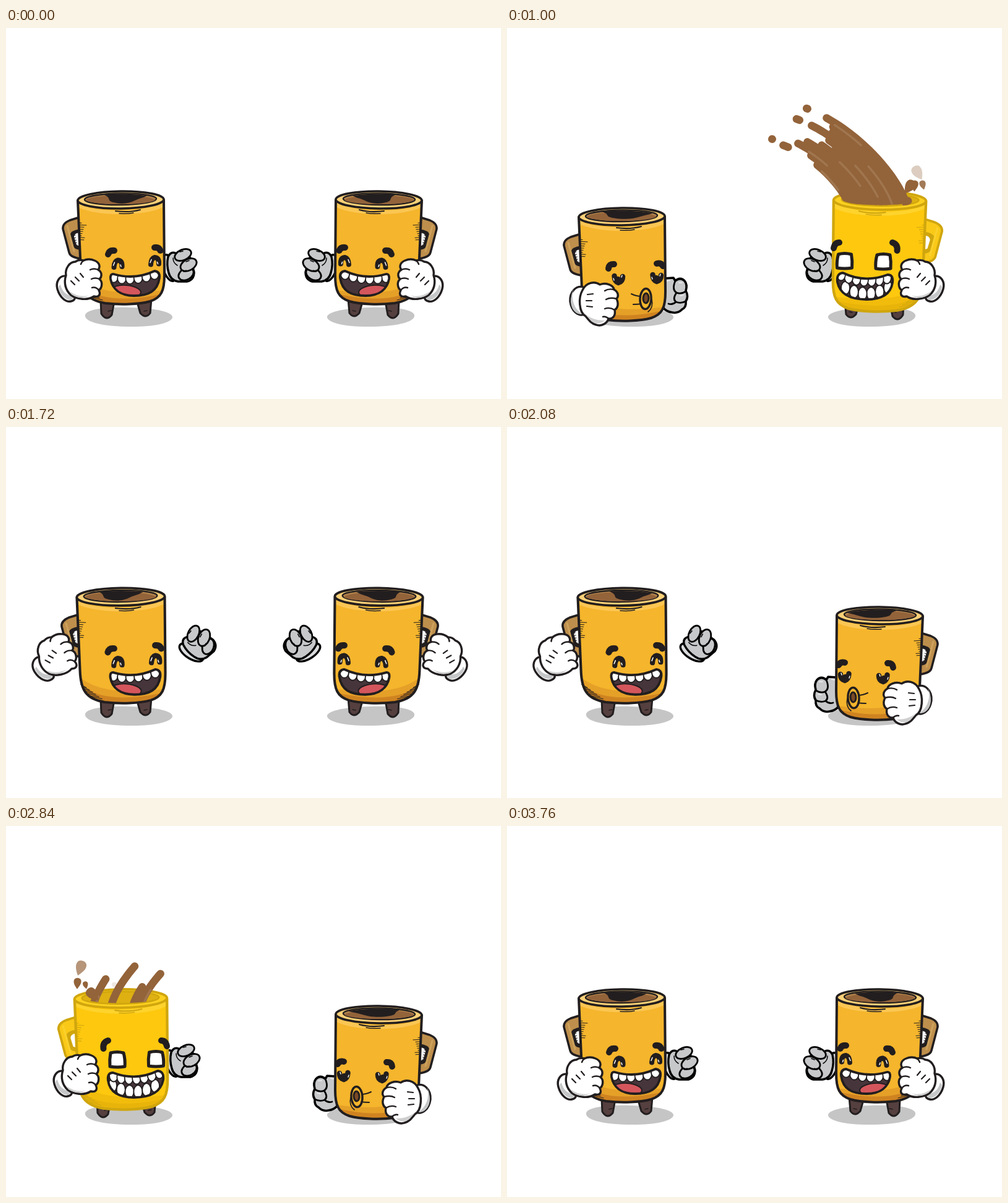
Write an HTML page with a canvas that moves like this. It is 800 by 600 pixels and loops after 3.8 s.

```html
<!DOCTYPE html>
<html lang="en">
<head>
<meta charset="utf-8">
<title>Coffee mugs</title>
<style>
html, body { margin: 0; width: 100%; height: 100%; overflow: hidden; background: #fff; }
canvas { display: block; width: 800px; height: 600px; }
</style>
</head>
<body>
<canvas id="stage" width="800" height="600"></canvas>
<script>
const ctx = document.getElementById('stage').getContext('2d');
const LOOP = 3800, SWAP = 1680, MIRROR = 788;
const INK = '#221e1f', BROWN = '#93633a', TAU = Math.PI * 2;
const clamp = (v, a, b) => Math.max(a, Math.min(b, v));
const mix = (a, b, k) => a + (b - a) * k;
const tint = (a, b, k) => `rgb(${a.map((v, i) => Math.round(mix(v, b[i], k)))})`;

// Keys are time, value pairs; smooth eases each span.
function track(t, keys, smooth = true) {
  if (t <= keys[0]) return keys[1];
  for (let i = 2; i < keys.length; i += 2) {
    if (t > keys[i]) continue;
    const k = (t - keys[i - 2]) / (keys[i] - keys[i - 2]);
    return mix(keys[i - 1], keys[i + 1], smooth ? k * k * (3 - 2 * k) : k);
  }
  return keys[keys.length - 1];
}

const cache = {};
const path = d => cache[d] || (cache[d] = new Path2D(d));
function shape(d, fill, stroke, width = 3.5) {
  const p = typeof d === 'string' ? path(d) : d;
  if (fill) { ctx.fillStyle = fill; ctx.fill(p); }
  if (stroke) { ctx.strokeStyle = stroke; ctx.lineWidth = width; ctx.stroke(p); }
}
function oval(x, y, rx, ry, fill, stroke, width, turn = 0) {
  const p = new Path2D();
  p.ellipse(x, y, rx, ry, turn, 0, TAU);
  shape(p, fill, stroke, width);
}
function group(draw) { ctx.save(); draw(); ctx.restore(); }
function about(x, y, sx, sy, turn = 0) {
  ctx.translate(x, y);
  ctx.rotate(turn * Math.PI / 180);
  ctx.scale(sx, sy);
  ctx.translate(-x, -y);
}

const SHADOW = 'M128 464C131 455 160 451 200 452C245 453 270 460 269 468C267 478 235 484 195 483C150 482 126 474 128 464Z';
const BODY = 'M116 279L121 395C122 425 130 440 160 445C185 448 215 447 233 442C251 436 256 425 256 400L255 278Z';
const SHADE = 'M119 404C145 426 185 433 257 424L257 450L119 450Z';
const DARK = 'M124 419C150 440 195 442 248 431L240 450L124 450Z';
const GLOW = 'M116 281C130 300 230 300 256 280L255 289C230 304 150 306 117 290Z';
const HANDLE = 'M119 306L103 311Q91 316 92 325L102 363Q104 371 121 373L121 357Q111 357 109 350L105 335Q106 329 119 327Z';
const HOLE = 'M119 327Q106 329 105 335L109 350Q111 357 121 357Z';

function handle(s) {
  shape(HOLE, s.ink);
  shape('M119 331L114 332Q110 334 110 338L114 351L120 353Z', '#fff');
  shape(HANDLE, s.handle, s.ink);
  shape('M99 320L110 361', null, s.handleShade, 3);
  if (s.hit < .5) {
    for (let i = 0; i < 5; i++) shape(`M${107 + i * .8} ${336 + i * 4}l5 -1`, null, s.ink, 1);
  }
}

function legs(h) {
  group(() => {
    ctx.translate(-6 * h, 2 * h);
    shape('M153 442L154 462Q162 475 171 464L175 442Z', '#55403f', INK, 3);
    shape('M165 458l5 -1', null, INK, 1.5);
  });
  group(() => {
    ctx.translate(7 * h, 2 * h);
    shape('M211 440L217 461Q226 471 233 461L235 438Z', '#55403f', INK, 3);
    shape('M223 458l5 -1', null, INK, 1.5);
  });
}

function body(s, t) {
  shape(BODY, s.fill);
  group(() => {
    ctx.clip(path(BODY));
    shape(SHADE, s.shade);
    shape(DARK, s.dark);
    shape(GLOW, s.glow);
  });
  shape(BODY, null, s.ink, 4);
  for (let i = 0; i < 9; i++) {
    shape(`M118 ${315 + i * 3.4}l${i === 1 ? 12 : 4 + (i * 5) % 6} .5`, null, s.ink, 1);
    if (i < 6) shape(`M${122 + i * 3} ${417 + i * 3.6}l${9 + i * 2} 5`, null, s.ink, 1);
  }
  shape('M177 296Q199 299 217 294', null, s.ink, 2);
  shape('M183 300Q197 301 206 299', null, s.ink, 1.5);
  oval(185.5, 278, 69.5, 14, s.rim, s.ink, 3.6, -.012);
  oval(185, 276.8, 58, 9.3, s.inside, s.ink, 2.4, -.012);
  if (s.hit < .5) group(() => {
    const p = new Path2D();
    p.ellipse(185, 276.8, 57, 8.3, 0, 0, TAU);
    ctx.clip(p);
    oval(185, 280, 57, 9.5, BROWN);
    ctx.translate(9 * Math.sin(t / LOOP * TAU * 4), 0);
    about(190, 270, 1 + .3 * s.crouch, 1 - .15 * s.crouch);
    shape('M153 268C174 274 160 279 174 282C188 286 200 283 208 279C216 275 224 275 232 268Z', INK);
  });
}

function eyes(s) {
  for (let i = 0; i < 2; i++) group(() => {
    if (s.eyes === 'shock') {
      ctx.translate(i ? 239 + 3.5 * s.hit : 183 - 3 * s.hit, 378 - i);
      shape('M-11 -11Q0 -14 10 -11Q13 0 12 11Q0 13 -12 11Q-13 0 -11 -11Z', '#fff', INK, 5);
    } else if (s.eyes === 'heart') {
      ctx.translate(i * 62, -i * 2);
      shape('M173.5 374Q174 383 180 385Q187 383 187 375M180 383L179 379', null, INK, 8.5);
      shape('M185 376l1 -3M172 378l1 3', null, '#fff', 1.4);
    } else {
      ctx.translate(i * 59.5, -i * 4.5);
      shape('M174.5 387Q175 377 181 375.5Q188 376 187.5 386', null, INK, 8);
      shape('M173.5 384l2 -5M185 383l1 3', null, '#fff', 1.5);
    }
  });
  const brows = s.eyes === 'shock'
    ? ['M157.5 360Q156 350 165 347', 'M251 347Q258 347 260 356']
    : s.eyes === 'heart'
      ? ['M164 362Q165 354 173 355', 'M242 354Q249 352 252 358']
      : ['M165 366Q167 359 175 360', 'M240 355Q247 354 249.5 360'];
  brows.forEach(d => shape(d, null, INK, 10));
}

function grin(d, top, bottom) {
  shape(d, '#46353a');
  group(() => {
    ctx.clip(path(d));
    if (!bottom) oval(194, 426, 24, 10, '#d4565c', INK, 2, .08);
    for (let i = 0; i < bottom; i++) {
      const x = 172 + i * 13.8;
      oval(x, 430 - Math.pow((x - 207) / 11, 2), 7, 10.5, '#fff', INK, 1.8);
    }
    for (let i = 0; i < top; i++) {
      const k = i / (top - 1);
      const x = mix(174, bottom ? 248 : 240, k);
      const y = 400 - 5 * k + (bottom ? 26 : 18) * k * (1 - k);
      oval(x, y + 3, 7, bottom ? 10.5 : 8.6, '#fff', INK, 1.8);
    }
  });
  shape(d, null, INK, 3.8);
}

function mouth(s, local) {
  if (s.eyes === 'heart') {
    ctx.translate(track(local, [400, 228, 480, 227, 1000, 224, 1160, 221, 1400, 230]) - 227, 0);
    shape('M204 403Q212 407 221 407M207 420Q214 420 221 419', null, INK, 2);
    shape('M237 412Q240 425 231 432', null, INK, 1.6);
    oval(227, 411, 9, 16.5, s.fill, INK, 3.4, .06);
    oval(227.5, 410, 4.5, 8, '#7b4a26', INK, 3, .06);
  } else if (s.hit > .4) {
    grin('M173 399Q210 413 245 396Q256 397 254 411C250 431 232 439 207 439C183 439 168 431 165 412Q163 399 173 399Z', 7, 6);
  } else {
    grin('M174 398Q208 408 240 393Q249 394 248 404C245 426 230 433 207 433C184 433 172 422 169 406Q168 397 174 398Z', 6, 0);
  }
}

function openGlove() {
  shape('M97 401C86 400 80 411 83 422C87 436 97 444 105 442Q114 440 110 432Z', '#fff', INK, 3.4);
  shape('M88 415C91 427 99 434 109 433Q110 439 104 440C94 439 86 429 85 418Z', '#c6c7c8');
  shape('M97 400C95 389 103 378 112 378Q118 374 125 376Q134 372 143 376C151 379 153 386 149 391C156 395 155 403 151 406C157 411 155 421 150 424C154 432 149 436 142 434C132 441 114 439 105 432C96 424 93 412 97 400Z', '#fff', INK, 3.4);
  shape('M103 426Q116 436 134 433Q121 440 106 431Z', '#cfcfcf');
  shape('M149 391Q142 388 136 391M151 406Q144 403 138 406M150 424Q145 418 139 420M126 376Q122 378 121 382', null, INK, 2.4);
  shape('M105 409l6 6M112 403l6 6M120 397l5 6', null, INK, 2.2);
}
function loweredGlove() {
  shape('M126 420C112 414 101 427 102 442C104 458 115 467 126 463Z', '#fff', INK, 3.4);
  shape('M108 422C103 434 106 453 122 463C110 464 103 453 103 441Q104 428 108 422Z', '#c6c7c8');
  shape('M122 424C128 411 142 409 150 415C160 411 172 416 173 423C180 427 181 434 177 438C181 446 179 453 174 456C176 465 171 471 164 470C162 478 152 483 144 480C136 478 132 472 127 466C116 460 115 436 122 424Z', '#fff', INK, 3.4);
  shape('M124 460Q136 473 158 473Q147 482 136 474Z', '#cfcfcf');
  shape('M173 423Q164 421 158 425M177 438Q167 435 160 439M174 456Q166 451 158 454M164 470Q160 466 155 467', null, INK, 2.4);
  shape('M130 431l9 -1M128 441h9M129 450l9 1', null, INK, 2.2);
}
function nearFist(s) {
  const c = s.crouch, w = s.cheer, b = s.bob, low = c > .5;
  group(() => {
    const k = low ? c - 1 : c;
    ctx.translate(23 * k - 43 * w - 5 * b, 39 * k - 37 * w - 5 * b);
    about(low ? 147 : 124, low ? 445 : 406, 1, 1, 35 * k - 16 * w);
    (low ? loweredGlove : openGlove)();
  });
}

const GREY = '#c6c8ca';
function raisedFist() {
  oval(264, 388, 10, 22, '#d9dbdc', '#000', 3.4, -.3);
  shape('M262 370Q266 361 274 364L298 372L304 395Q304 407 293 410L278 410Q266 408 263 396Q259 383 262 370Z', GREY, '#000', 3.4);
  oval(291, 398, 13, 9, GREY, '#000', 2.8, -.5);
  oval(295, 383, 14, 9, GREY, '#000', 2.8, -.5);
  oval(286, 367, 14, 8.5, GREY, '#000', 2.8, -.4);
  shape('M270 372Q270 380 277 384M281 362l5 -1M291 378l5 -2M287 394l4 -2', null, '#000', 1.5);
}
function loweredFist() {
  shape('M254 405L269 404L272 409Q280 402 287 409Q292 415 289 425Q294 434 289 442Q290 452 283 455Q276 462 267 460Q258 459 252 452Z', GREY, '#000', 3.6);
  shape('M272 409Q266 423 274 428Q281 431 289 426M274 428Q267 438 273 443Q281 446 289 442M273 443Q268 448 261 446', null, '#000', 2.8);
  shape('M258 409l5 -1M278 412l5 0M280 433l5 -1', null, '#e6e7e8', 2);
}
function farFist(s) {
  const c = s.crouch, w = s.cheer, b = s.bob, low = c > .5;
  group(() => {
    const k = low ? c - 1 : c;
    ctx.translate(-14 * k + 28 * w + 5 * b, 48 * k - 36 * w - 4 * b);
    about(low ? 271 : 285, low ? 432 : 384, 1, 1, 25 * k - 40 * w);
    (low ? loweredFist : raisedFist)();
  });
}

function mug(s, t, local) {
  shape(SHADOW, '#c5c5c6');
  group(() => {
    ctx.translate(0, 27 * s.crouch);
    about(186, 447, 1 + .022 * s.cheer, 1 + .02 * s.cheer);
    group(() => { about(186, 263, 1 + .075 * s.hit, 1 + .065 * s.hit); handle(s); });
  });
  farFist(s);
  legs(s.hit);
  group(() => {
    ctx.translate(0, 27 * s.crouch - s.bob * (1 - s.hit));
    about(186, 447, 1 + .022 * s.cheer, 1 + .02 * s.cheer);
    group(() => { about(186, 263, 1 + .075 * s.hit, 1 + .065 * s.hit); body(s, t); });
    eyes(s);
    mouth(s, local);
  });
}

function pose(cheer, crouch, hit, bob, hurt) {
  const c = (a, b) => tint(a, b, hit);
  return {
    cheer, crouch, hit, bob,
    eyes: hurt ? 'shock' : crouch > .55 ? 'heart' : 'happy',
    ink: c([34, 30, 31], [208, 166, 14]),
    fill: c([245, 181, 44], [253, 200, 14]),
    shade: c([229, 160, 40], [242, 188, 12]),
    dark: c([207, 131, 32], [233, 180, 10]),
    glow: c([251, 198, 83], [254, 211, 44]),
    rim: c([253, 209, 120], [252, 208, 32]),
    inside: c([176, 128, 73], [222, 176, 18]),
    handle: c([190, 143, 76], [250, 201, 24]),
    handleShade: c([205, 162, 92], [250, 208, 44])
  };
}

const hitAt = t => track(t, [680, 0, 760, 1, 1180, 1, 1290, 0]);
const hurtAt = t => t > 700 && t < 1430;

function leftPose(t) {
  return pose(
    track(t, [0, 0, 90, 1, 160, 1, 310, 0, 1480, 0, 1720, 1, 2120, 1, 2240, .9, 2430, 0]),
    track(t, [160, 0, 340, 1, 1460, 1, 1640, 0]),
    hitAt(t - SWAP), track(t, [2520, 0, 2800, 1, 2880, 1, 3080, 0]), hurtAt(t - SWAP));
}
function rightPose(t) {
  return pose(
    track(t, [1500, 0, 1690, 1, 1750, 1, 1920, 0, 3120, 0, 3330, 1, 3430, 1, 3690, 0]),
    track(t, [1800, 0, 2000, 1, 3090, 1, 3280, 0]),
    hitAt(t), track(t, [200, 0, 450, 1, 600, .9, 780, 0]), hurtAt(t));
}

// Strands: arc radius, head position at launch, tail position on landing.
const STRANDS = [
  [254, -.69, .48], [245, -.76, .54], [235, -.82, .56], [225, -.55, .435],
  [217, -.87, .58], [210, -.95, .648], [200, -.92, .57], [190, -.68, .479],
  [178, -.87, .427], [170, -.9, .57], [162, -.654, .66]
];
// Loose drops behind the tail: radius, lag, length.
const DROPS = [[254, -.128, .006], [225, -.155, .022], [168, -.28, .003], [162, -.16, .05]];

function arcPoint(r, u, dir) {
  const a = Math.min(Math.abs(u), 1);
  const f = .5 * a * a + .5 * (1 - Math.sqrt(1 - a * a));
  return [394 + dir * Math.sign(u) * a * r, 300 - .74 * r * (1 - f) + (Math.abs(u) - a) * 200];
}
function strand(r, from, to, dir, color, width) {
  from = clamp(from, -1.15, 1.15);
  to = clamp(to, -1.15, 1.15);
  if (to <= from) return;
  const p = new Path2D();
  for (let i = 0; i <= 32; i++) p.lineTo(...arcPoint(r, mix(from, to, i / 32), dir));
  shape(p, null, color, width);
}

function stream(local, dir) {
  if (local < 390 || local > 1260) return;
  const e = Math.pow(Math.max(0, local - 385) / 262, 1.6);
  const spread = Math.min(1, e / .18);
  const tail = -1 + 2 * track(local, [600, -.1, 650, 0, 1000, .74, 1120, .87, 1160, .955, 1220, 1.16], false);
  const landing = clamp((local - 1000) / 160, 0, 1);
  const runs = STRANDS.map(([r, h, l]) => [
    r, local < 640 ? -1.15 : tail + (l - .48) * (1 + landing), -1.12 + 2.1 * e + (h + .7) * spread
  ]);
  runs.forEach(([r, a, b]) => strand(r, a, b, dir, BROWN, 12.5));
  runs.forEach(([r, a, b], i) => {
    if (i % 2) return;
    const start = Math.max(a, -1) + .06 + (i * 7 % 5) * .05;
    strand(r - 4, start, Math.min(b - .05, start + .17), dir, '#a0764f', 3.5);
  });
  if (local > 800 && local < 1140) DROPS.forEach(([r, lag, len]) => {
    const u = tail + lag * (1 - landing);
    strand(r, u, u + len, dir, BROWN, 12.5);
  });
}

function splash(local) {
  for (let i = 0; i < 11; i++) {
    const age = (local - 760 - i * 48) / 270;
    if (age <= 0 || age >= 1) continue;
    const side = i % 4 === 3 ? 1 : -1;
    const x = 140 + side * age * (16 + i * 17 % 30);
    const y = 280 - (i % 4 ? 85 : 165) * age * (1 - .75 * age);
    const size = i % 4 ? 4.5 + i % 3 : 9;
    ctx.globalAlpha = clamp((1 - age) * 3, 0, 1);
    group(() => {
      ctx.translate(x, y);
      ctx.rotate(side * (.9 - age * 1.6));
      ctx.scale(size, size);
      shape('M0 1.8C-.8 .8 -1 .2 -.9 -.3C-.8 -1.2 .8 -1.2 .9 -.3C1 .2 .8 .8 0 1.8Z', BROWN);
    });
    ctx.globalAlpha = 1;
  }
}

function clipRims(left, right) {
  const p = new Path2D();
  [[left, 185], [right, MIRROR - 185]].forEach(([s, x], i) => {
    const y = 276.8 + 27 * s.crouch - 3 * s.cheer + s.hit;
    p.rect(i * 394, 0, 406, y);
    p.ellipse(x, y, 57 + 4 * s.hit, 8.6, 0, 0, TAU);
  });
  ctx.clip(p);
}

function flip() { ctx.translate(MIRROR, 0); ctx.scale(-1, 1); }

function draw(t) {
  const left = leftPose(t), right = rightPose(t);
  ctx.fillStyle = '#fff';
  ctx.fillRect(0, 0, 800, 600);
  mug(left, t, t);
  group(() => { flip(); mug(right, t, t - SWAP); });
  group(() => {
    clipRims(left, right);
    stream(t, 1);
    stream(t - SWAP, -1);
  });
  splash(t - SWAP);
  group(() => { flip(); splash(t); nearFist(right); });
  nearFist(left);
}

ctx.lineCap = ctx.lineJoin = 'round';
const start = performance.now();
function tick() {
  draw((performance.now() - start) % LOOP);
  requestAnimationFrame(tick);
}
tick();
</script>
</body>
</html>
```
